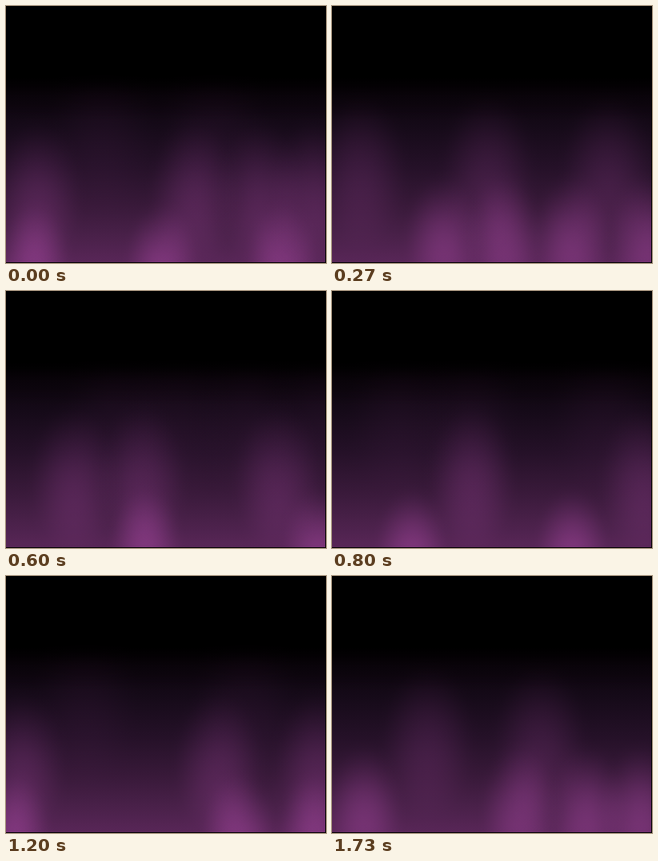
An HTML page with a canvas that plays this animation: 400 by 322 pixels, repeating every 1800 ms.

```html
<!DOCTYPE html>
<html>
<head>
<meta charset="utf-8">
<style>
html, body { margin: 0; height: 100%; overflow: hidden; background: #000; }
canvas { display: block; width: 100vw; height: 100vh; }
</style>
</head>
<body>
<canvas id="stage" width="400" height="322"></canvas>
<script>
const W = 399, H = 321, TOP = 84;
const LOOP = 1800, STEPS = 27, WAVE = 200, FADE_IN = 110, LIFE = 450;
const ctx = document.getElementById('stage').getContext('2d');

// Every WAVE ms a new row of puffs leaves the floor at these x positions.
const waves = [
  [35, 195, 345], [140, 215, 300, 395], [85, 170, 340],
  [175, 390], [100, 300], [20, 265, 390],
  [10, 290, 385], [120, 260], [40, 235, 318, 385]
];

function verticalFill(stops) {
  const fill = ctx.createLinearGradient(0, TOP, 0, H);
  for (const [pos, color] of stops) fill.addColorStop(pos, color);
  return fill;
}

const haze = verticalFill([
  [0, '#000'], [.08, '#0a030a'], [.28, '#150a18'],
  [.5, '#251128'], [.7, '#381939'], [.87, '#4a214a'], [1, '#582657']
]);
const ceiling = verticalFill([[0, '#000'], [.12, '#bbb'], [.25, '#fff']]);

// Soft round glow with a bell-shaped falloff.
const glow = ctx.createRadialGradient(0, 0, 0, 0, 0, 1);
for (let r = 0; r <= 1; r += .125) {
  glow.addColorStop(r, `rgba(36, 15, 34, ${(1 - r * r) ** 2})`);
}

function puff(x, age) {
  if (age < -FADE_IN || age > LIFE) return;
  const rise = Math.max(0, age / LIFE);
  ctx.save();
  ctx.globalAlpha = age < 0 ? 1 + age / FADE_IN : 1 - rise * rise;
  ctx.translate(x, H - 190 * rise);
  ctx.scale(50 + 25 * rise, 80 + 50 * rise);
  ctx.fillStyle = glow;
  ctx.fillRect(-1, -1, 2, 2);
  ctx.restore();
}

function paint(fill, mode) {
  ctx.globalCompositeOperation = mode;
  ctx.fillStyle = fill;
  ctx.fillRect(0, 0, W, H);
}

function draw(t) {
  paint(haze, 'source-over');
  ctx.globalCompositeOperation = 'lighter';
  waves.forEach((row, i) => {
    // Age wraps around the loop, so late puffs carry on into the next one.
    const age = (t - i * WAVE + FADE_IN + LOOP) % LOOP - FADE_IN;
    for (const x of row) puff(x, age);
  });
  paint(ceiling, 'multiply');
}

ctx.beginPath();
ctx.rect(0, 0, W, H);
ctx.clip();

function tick() {
  const step = Math.floor(performance.now() % LOOP / LOOP * STEPS);
  draw(step * LOOP / STEPS);
  requestAnimationFrame(tick);
}
tick();
</script>
</body>
</html>
```
